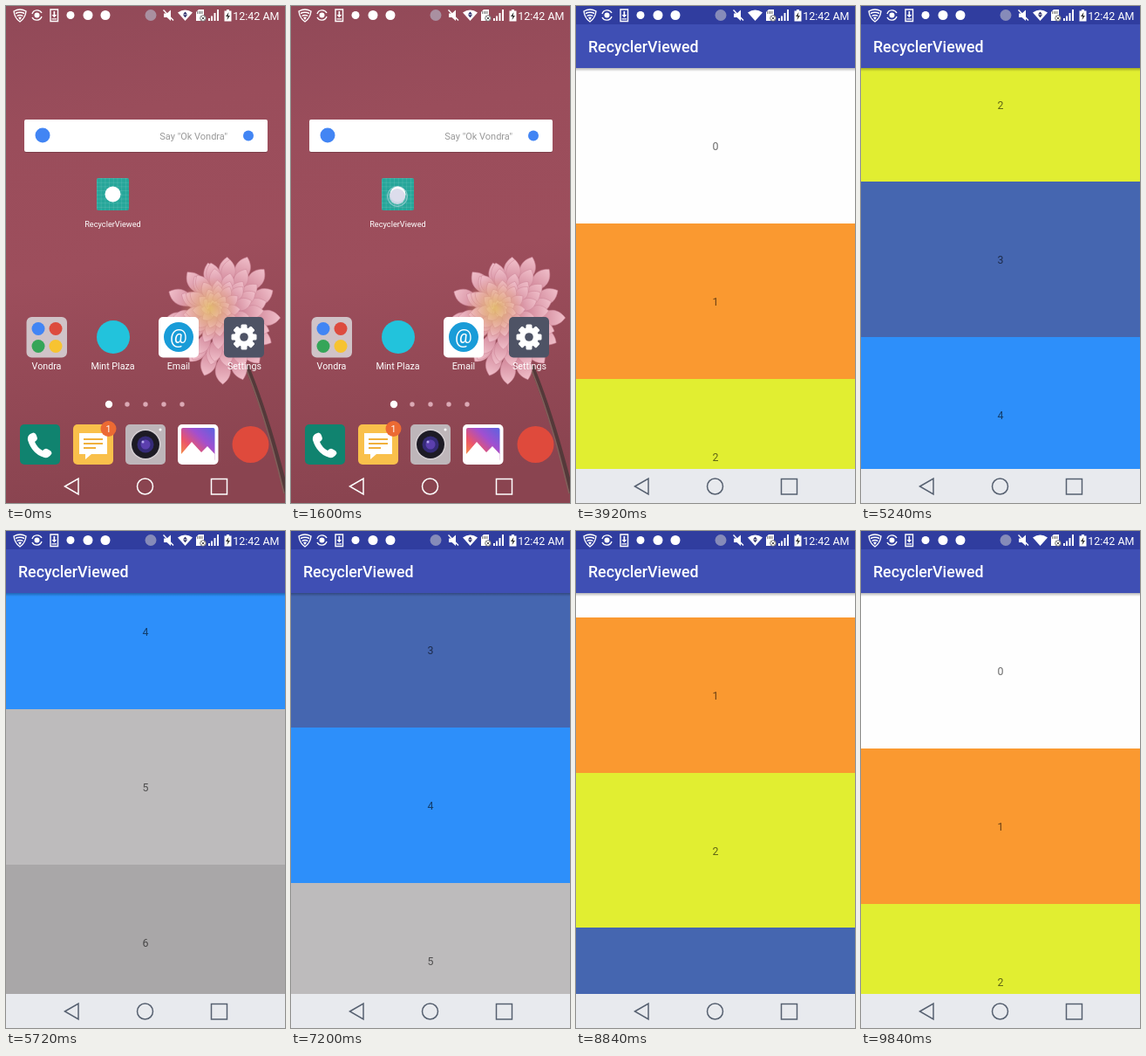
Write an HTML page that moves like this. It is 320 px wide and 569 px high and loops after 9880 ms.

```html
<!DOCTYPE html>
<html lang="en">
<head>
<meta charset="utf-8">
<title>RecyclerViewed</title>
<style>
html, body { margin: 0; width: 100%; height: 100%; overflow: hidden; background: #9a4c5b; }
svg { display: block; width: 100vw; height: 100vh; font-family: Roboto, "Noto Sans", sans-serif; }
.label { font-size: 10.7px; fill: #fff; text-anchor: middle; }
.num { font-size: 12.4px; fill: #000; fill-opacity: .58; text-anchor: middle; }
.line { fill: none; stroke-width: 1.4; }
</style>
</head>
<body>
<svg viewBox="0 0 320 569" preserveAspectRatio="none">
  <defs>
    <linearGradient id="wall" x1="0" y1="0" x2=".1" y2="1">
      <stop offset="0" stop-color="#914958"/>
      <stop offset=".25" stop-color="#9a4d5b"/>
      <stop offset=".55" stop-color="#9d4e5c"/>
      <stop offset="1" stop-color="#8a4450"/>
    </linearGradient>
    <linearGradient id="shade" x1="0" y1="0" x2="0" y2="1">
      <stop offset="0" stop-color="#000" stop-opacity=".28"/>
      <stop offset="1" stop-color="#000" stop-opacity="0"/>
    </linearGradient>
    <linearGradient id="petal" x1="0" y1="0" x2="1" y2="0">
      <stop offset="0" stop-color="#cb7b8f"/>
      <stop offset="1" stop-color="#f0bfca"/>
    </linearGradient>
    <radialGradient id="core">
      <stop offset="0" stop-color="#e8c868" stop-opacity=".8"/>
      <stop offset="1" stop-color="#e8a070" stop-opacity="0"/>
    </radialGradient>
    <linearGradient id="sky" x1="0" y1="1" x2="1" y2="0">
      <stop offset="0" stop-color="#f7a63c"/>
      <stop offset=".35" stop-color="#ec5568"/>
      <stop offset=".65" stop-color="#a14fd0"/>
      <stop offset="1" stop-color="#5a63e0"/>
    </linearGradient>
    <pattern id="mesh" x="104" y="197" width="4.7" height="4.7" patternUnits="userSpaceOnUse">
      <path d="M0 0H4.7M0 0V4.7" stroke="#fff" stroke-opacity=".3" stroke-width=".6"/>
    </pattern>
    <clipPath id="grow"><rect id="hole"/></clipPath>
    <clipPath id="view"><rect y="71" width="320" height="459"/></clipPath>
  </defs>

  <g id="home">
    <rect width="320" height="569" fill="url(#wall)"/>
    <path d="M276 412Q300 470 322 558" fill="none" stroke="#54393a" stroke-width="5"/>
    <path d="M274 412Q298 470 319 558" fill="none" stroke="#80605a" stroke-width="1.500"/>
    <g id="flower"></g>

    <rect x="21" y="131" width="279" height="37" rx="2" fill="#000" opacity=".2"/>
    <rect x="21" y="130" width="279" height="37" rx="2" fill="#fff"/>
    <circle cx="42" cy="148" r="8.5" fill="#4285f4"/>
    <text x="254" y="153" font-size="11" fill="#999" text-anchor="end">Say "Ok Vondra"</text>
    <circle cx="278" cy="148.500" r="6" fill="#4285f4"/>

    <rect x="104" y="197" width="37" height="37" rx="2" fill="#26a69a"/>
    <rect x="104" y="197" width="37" height="37" rx="2" fill="url(#mesh)"/>
    <circle cx="122.500" cy="215.500" r="9" fill="#fff"/>
    <text class="label" x="122.500" y="253" style="font-size:9.2px">RecyclerViewed</text>

    <rect x="23.500" y="356" width="46.500" height="46.500" rx="6" fill="#d0c3c8"/>
    <circle cx="37" cy="369.500" r="7.500" fill="#4285f4"/>
    <circle cx="57" cy="369.500" r="7.500" fill="#dd4b3e"/>
    <circle cx="37" cy="389.500" r="7.500" fill="#35a558"/>
    <circle cx="57" cy="389.500" r="7.500" fill="#f7c331"/>
    <circle cx="123" cy="379" r="19" fill="#22c3dc"/>
    <rect x="175" y="356" width="46" height="46.500" rx="5" fill="#fff"/>
    <circle cx="198" cy="379" r="17" fill="#199cd8"/>
    <text x="198" y="386" font-size="22" fill="#fff" text-anchor="middle">@</text>
    <rect x="250" y="356" width="46" height="46.500" rx="5" fill="#4e5365"/>
    <g id="gear" fill="#fff"></g>
    <text class="label" x="46.500" y="416">Vondra</text>
    <text class="label" x="122.500" y="416">Mint Plaza</text>
    <text class="label" x="198" y="416">Email</text>
    <text class="label" x="273.500" y="416">Settings</text>
    <g id="dots"></g>

    <rect x="16" y="479" width="46" height="46" rx="5" fill="#10836f"/>
    <path d="M30 489q4-2 6 6q0 2-3 4q3 7 9 10q3-3 5-2q7 3 5 6q-3 5-8 4q-14-4-19-20q-1-6 5-8z" fill="#fff"/>
    <rect x="77" y="479" width="46" height="46" rx="5" fill="#f9c04b"/>
    <path d="M84 489h32v24h-18l-7 6v-6h-7z" fill="#fff"/>
    <path d="M89 496h22M89 501h22M89 506h14" stroke="#f0b03c" stroke-width="2"/>
    <circle cx="117.500" cy="484" r="9" fill="#ec6a33"/>
    <text class="label" x="117.500" y="488">1</text>
    <rect x="137" y="479" width="46" height="46" rx="5" fill="#beb6ba"/>
    <circle cx="160" cy="502" r="17.500" fill="#d6d0d4"/>
    <circle cx="160" cy="502" r="16" fill="#1d1b25"/>
    <circle cx="160" cy="502" r="9.500" fill="#352b78"/>
    <circle cx="160" cy="502" r="5.500" fill="#5b3fae"/>
    <circle cx="157" cy="499" r="1.500" fill="#b5a9ee"/>
    <circle cx="177" cy="485" r="1.500" fill="#fff"/>
    <rect x="197" y="479" width="46.500" height="46" rx="5" fill="#fff"/>
    <rect x="201" y="483" width="38.500" height="38" rx="2" fill="url(#sky)"/>
    <path d="M201 513L213 499L224 511L231 504L239.500 513V521H201z" fill="#fff"/>
    <circle cx="280.500" cy="502" r="21" fill="#df4a3c"/>
  </g>

  <g id="app" clip-path="url(#grow)">
    <rect width="320" height="569" fill="#faf8fa"/>
    <rect width="320" height="21" fill="#3537a3"/>
    <g id="content">
      <rect y="71" width="320" height="459" fill="#faf8fa"/>
      <g clip-path="url(#view)"><g id="list"></g></g>
      <rect y="71" width="320" height="4" fill="url(#shade)"/>
      <rect width="320" height="21" fill="#303d9f"/>
      <rect y="21" width="320" height="50" fill="#3f4fb4"/>
      <text x="14" y="53.300" font-size="17.780" font-weight="500" fill="#fff">RecyclerViewed</text>
    </g>
  </g>

  <g id="status" fill="#fff" stroke="#fff" stroke-width="0">
    <path class="line" d="M9 6Q16 2 23 6Q22 14 16 18Q10 14 9 6z"/>
    <path class="line" d="M11 8.500Q16 6 21 8.500M12.500 11.500Q16 9.500 19.500 11.500"/>
    <path d="M14 13Q16 12 18 13L16 16z"/>
    <path class="line" d="M30 9A6 6 0 0 1 41 8M41 12A6 6 0 0 1 30 13"/>
    <circle cx="35.500" cy="10.500" r="3"/>
    <path class="line" d="M51 4h8.500v13.500h-8.500z"/>
    <path d="M54.500 6h1.700v4h2l-2.900 3.200l-2.900-3.200h2.100zM52.500 14.200h5.600v1.200h-5.600z"/>
    <circle cx="74" cy="10.500" r="4.500"/>
    <circle cx="94" cy="10.500" r="5.500"/>
    <circle cx="114" cy="10.500" r="5.500"/>
    <circle cx="166" cy="10.500" r="6.500" fill="#b5b5c8" opacity=".65"/>
    <path d="M181 8.500h3.500l4.500-4v12.500l-4.500-4h-3.500z"/>
    <path class="line" d="M180.500 4.500L192 16.500"/>
    <path d="M197 7.500Q205.500 1.500 214 7.500L205.500 17z"/>
    <g fill="#2b2c68"><path id="up" d="M203 9.500h5l-2.500-3z"/><path id="down" d="M203 10.300h5l-2.500 3z"/></g>
    <path d="M218 7l3-3h6v13h-9z"/>
    <path d="M220 6v3M222.500 6v3M224.800 6v3" stroke="#555" stroke-width="1"/>
    <circle cx="226" cy="14" r="3.300" stroke="#555" stroke-width=".8"/>
    <path d="M224.500 12.500l3 3m0-3l-3 3" stroke="#555" stroke-width="1"/>
    <path d="M232 14h2v3h-2zM235 11.500h2v5.500h-2zM238.500 8h2v9h-2zM242 4h2v13h-2z"/>
    <path d="M250.500 5.500h2.500v-1.500h3v1.500h2.500v12h-8z"/>
    <path d="M255.500 7l-3.500 5h2.300l-.8 4l3.500-5h-2.300z" fill="#333"/>
    <text x="313.500" y="15.500" font-size="12.500" text-anchor="end">12:42 AM</text>
  </g>

  <rect id="navBg" y="530" width="320" height="39" fill="#e8eaee"/>
  <g id="nav" fill="none" stroke-width="1.500">
    <path d="M67.500 550L83 541V559z"/>
    <circle cx="159.500" cy="550" r="9"/>
    <rect x="235.500" y="541.500" width="18" height="17.500"/>
  </g>
  <g id="touch">
    <circle r="11.500" fill="#fff" fill-opacity=".15" stroke="#dfe2f5" stroke-opacity=".5"/>
    <circle r="9" fill="#d8d9ea" fill-opacity=".9"/>
  </g>
</svg>
<script>
const LOOP = 9880, STEP = 40, ROW = 1600 / 9;
const END = 7 * ROW - 459;
const colors = ['#fefefe', '#fa9930', '#e1ee31', '#4566b0', '#2d8ffa', '#bdbbbc', '#a9a7a8'];

// start, end, scroll at end; drags also give the finger's x and first y
const moves = [
  [4960, 5120, 250, 188, 460],
  [5120, 5440, 430],
  [5440, 5560, 559, 176, 440],
  [5560, 5960, END],
  [6320, 6560, 700, 226, 290],
  [6560, 7320, 557],
  [7480, 7680, 490, 232, 300],
  [7680, 8000, 432],
  [8040, 8280, 321, 236, 309],
  [8280, 8840, 150],
  [8880, 9080, 70, 234, 310],
  [9080, 9640, 0]
];

const $ = id => document.getElementById(id);
const set = (el, attrs) => { for (const k in attrs) el.setAttribute(k, attrs[k]); };
const add = (parent, tag, attrs, text) => {
  const el = document.createElementNS('http://www.w3.org/2000/svg', tag);
  set(el, attrs);
  if (text !== undefined) el.textContent = text;
  parent.appendChild(el);
  return el;
};
const ramp = (t, a, b) => Math.min(1, Math.max(0, (t - a) / (b - a)));
const show = (id, on) => { $(id).style.display = on ? '' : 'none'; };

function drawFlower() {
  const g = $('flower'), rings = 7;
  for (let ring = 0; ring < rings; ring++) {
    const k = 1 - ring / rings, count = 16 - ring;
    const cx = 237 + 13 * k, cy = 345 + 12 * k;
    const len = 14 + 22 * k, w = 5 + 5 * k;
    for (let i = 0; i < count; i++) {
      const a = (i + ring * .5 + .2 * Math.sin(i * 7 + ring)) / count * Math.PI * 2;
      const reach = k * (.95 + .07 * Math.sin(i * 5 + ring * 3));
      const x = Math.cos(a) * 68 * reach, y = Math.sin(a) * 75 * reach;
      const turn = Math.atan2(y, x) * 180 / Math.PI;
      add(g, 'path', {
        d: `M${-len} 0C${-len * .6} ${-w} ${-w} ${-w * 1.3} 0 0C${-w} ${w * 1.3} ${-len * .6} ${w} ${-len} 0z`,
        transform: `translate(${cx + x} ${cy + y}) rotate(${turn})`,
        fill: 'url(#petal)', stroke: '#cd8799', 'stroke-width': .5
      });
    }
  }
  add(g, 'ellipse', { cx: 234, cy: 346, rx: 34, ry: 36, fill: 'url(#core)' });
}

function drawGear() {
  const g = $('gear');
  for (let a = 0; a < 360; a += 45)
    add(g, 'rect', { x: 269.5, y: 364.5, width: 7, height: 8, rx: 1.5, transform: `rotate(${a} 273 379)` });
  add(g, 'circle', { cx: 273, cy: 379, r: 11 });
  add(g, 'circle', { cx: 273, cy: 379, r: 4.8, fill: '#4e5365' });
}

function drawList() {
  colors.forEach((fill, i) => {
    const y = Math.round(71 + i * ROW);
    add($('list'), 'rect', { y, width: 320, height: ROW + 1, fill });
    add($('list'), 'text', { class: 'num', x: 160, y: y + 94 }, i);
  });
}

function drawDots() {
  for (let i = 0; i < 5; i++)
    add($('dots'), 'circle', { cx: 118 + i * 21, cy: 456, r: i ? 2.7 : 4.2, fill: i ? '#dba9b5' : '#fff' });
}

function scrollAt(t) {
  let pos = 0, finger = null;
  for (const [t0, t1, to, x, y] of moves) {
    if (t < t0) break;
    const u = ramp(t, t0, t1), from = pos;
    pos = from + (to - from) * (x ? u : 1 - (1 - u) ** 4);
    if (x && t < t1) finger = [x, y + from - pos];
  }
  return { pos, finger };
}

function render(now) {
  const t = Math.floor(now % LOOP / STEP) * STEP;

  // the window grows out of the tapped icon
  const p = 1 - (1 - ramp(t, 1640, 2080)) ** 3;
  set($('hole'), {
    x: 104 * (1 - p), y: 197 * (1 - p),
    width: 37 + 283 * p, height: 37 + 532 * p
  });
  show('app', p > 0);
  $('app').style.opacity = ramp(t, 1640, 1840);
  const light = ramp(t, 1840, 2160);
  $('navBg').style.opacity = light;
  $('nav').style.stroke = light > .5 ? '#566070' : '#fff';
  $('content').style.opacity = ramp(t, 3640, 3920);

  const { pos, finger } = scrollAt(t);
  set($('list'), { transform: `translate(0 ${-Math.round(pos)})` });
  const tip = t >= 1560 && t < 1680 ? [122, 218] : finger;
  show('touch', tip);
  if (tip) set($('touch'), { transform: `translate(${tip})` });

  const busy = t < 2160 || t >= 4800 && t < 9840;
  show('up', busy);
  show('down', busy || t < 2800);
}

drawFlower();
drawGear();
drawList();
drawDots();

const start = performance.now();
(function tick() {
  render(performance.now() - start);
  requestAnimationFrame(tick);
})();
</script>
</body>
</html>
```
